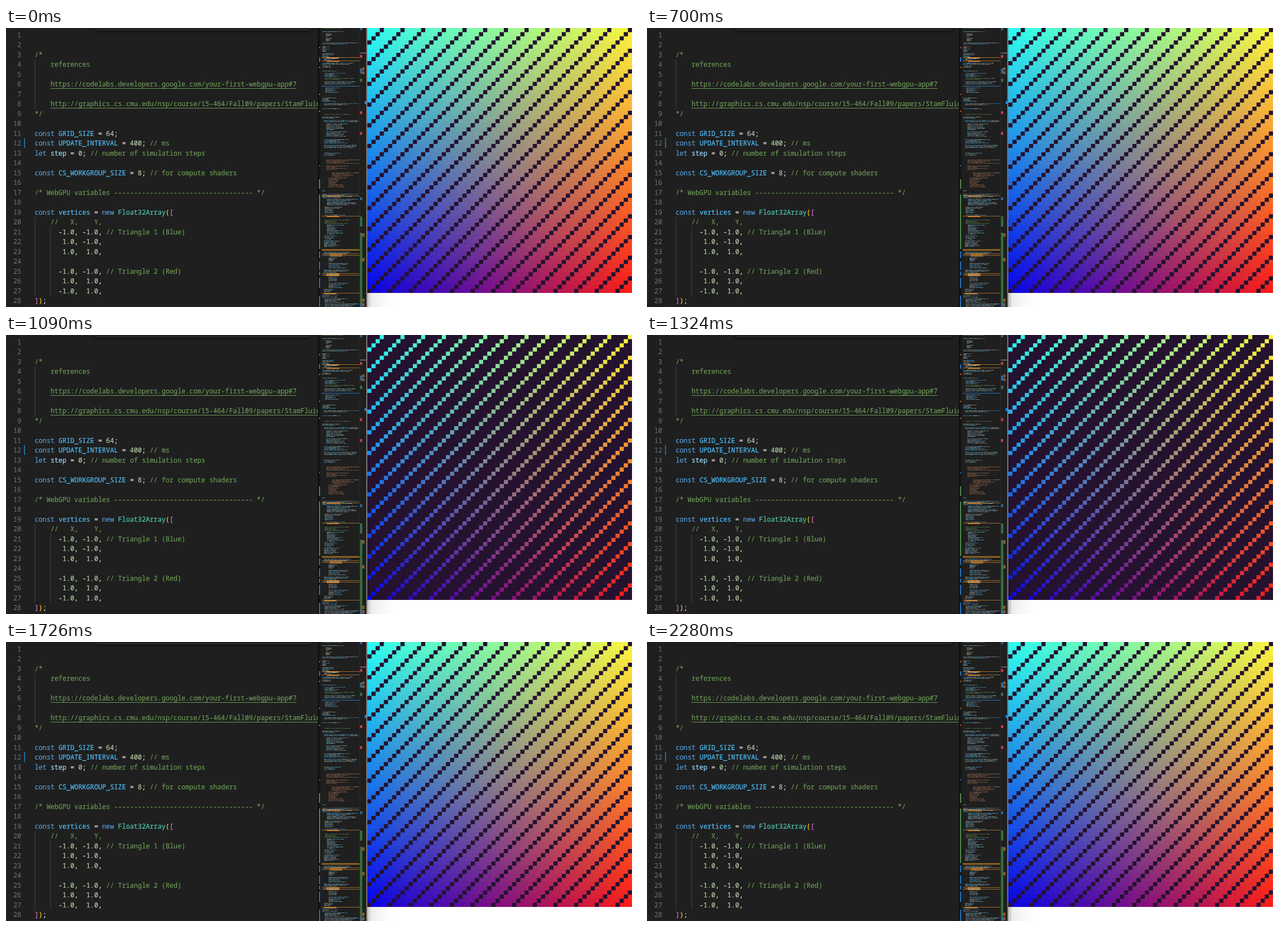
Recreate the animation shown at these times as an HTML page with a canvas. Size 1130 by 496 pixels, loop 2620 ms.

```html
<!DOCTYPE html>
<html lang="en">
<head>
<meta charset="utf-8">
<title>Grid simulation beside its code</title>
<style>
html, body { margin: 0; width: 100%; height: 100%; overflow: hidden; background: #fff; }
#stage { position: relative; width: 1130px; height: 496px; overflow: hidden; background: #fff; }
canvas { position: absolute; left: 0; top: 0; }
.grid { left: 643px; width: 471px; height: 471px; }
#editor {
  position: absolute; left: 0; top: 0; width: 555px; height: 496px; overflow: hidden;
  background: #1f1f1f; color: #d4d4d4;
  font: 11.775px/17.5px "Noto Sans Mono", "DejaVu Sans Mono", monospace;
  font-variant-ligatures: none; white-space: pre;
}
#editor div { position: absolute; }
.num { left: 0; width: 27px; text-align: right; color: #6e7681; }
.code { left: 51px; -webkit-text-stroke: 0.2px; }
.guide { width: 1px; background: #404040; }
.comment { color: #6a9955; }
.keyword { color: #569cd6; }
.constant { color: #4fc1ff; }
.variable { color: #9cdcfe; }
.type { color: #4ec9b0; }
.number { color: #b5cea8; }
.paren { color: #ffd700; }
.square { color: #da70d6; }
.link { text-decoration: underline 1px; text-underline-offset: 3px; text-decoration-skip-ink: none; }
#edited {
  left: 32px; top: 196px; width: 2px; height: 17px;
  background: repeating-linear-gradient(-45deg, #2090d3 0 1.5px, #1f4a66 1.5px 3px);
}
#popup {
  left: 158px; top: -12px; width: 383px; height: 14px; background: #1f1f1f;
  border: 1px solid #3c3c3c; border-radius: 4px; box-shadow: 0 0 7px #000;
}
</style>
</head>
<body>
<div id="stage">
  <canvas id="side" width="1130" height="496"></canvas>
  <div id="editor"></div>
  <canvas id="stripes" class="grid" width="512" height="512"></canvas>
  <canvas id="inverse" class="grid" width="512" height="512"></canvas>
</div>
<script>
const $ = id => document.getElementById(id);

const source = `

/*
    references

    https://codelabs.developers.google.com/your-first-webgpu-app#7

    http://graphics.cs.cmu.edu/nsp/course/15-464/Fall09/papers/StamFluids.pdf
*/

const GRID_SIZE = 64;
const UPDATE_INTERVAL = 400; // ms
let step = 0; // number of simulation steps

const CS_WORKGROUP_SIZE = 8; // for compute shaders

/* WebGPU variables ${"-".repeat(35)} */

const vertices = new Float32Array([
    //   X,    Y,
      -1.0, -1.0, // Triangle 1 (Blue)
       1.0, -1.0,
       1.0,  1.0,

      -1.0, -1.0, // Triangle 2 (Red)
       1.0,  1.0,
      -1.0,  1.0,
]);`;

// Editor text
const kinds = ["comment", "keyword", "constant", "variable", "type", "number", "paren", "square"];
const token = /(\/[/*].*)|\b(const|let|new)\b|\b([A-Z_]{4,}|vertices)\b|\b(step)\b|\b(Float32Array)\b|(\d[\d.]*)|([()])|([[\]])/g;
const span = (kind, text) => `<span class="${kind}">${text}</span>`;

function highlight(line, row) {
  if (row > 1 && row < 9)
    return span("comment", line.replace(/http\S+/, url => span("link", url)));
  return line.replace(token, (text, ...groups) =>
    span(kinds[groups.findIndex((g, i) => i < kinds.length && g !== undefined)], text));
}

const guide = (x, top, height) =>
  `<div class="guide" style="left:${x}px;top:${top}px;height:${height}px"></div>`;

$("editor").innerHTML = guide(51, 56, 88) + guide(51, 336, 140) + guide(79, 353, 123) +
  source.split("\n").map((line, row) => {
    const top = `style="top:${3.5 + row * 17.5}px"`;
    return `<div class="num" ${top}>${row + 1}</div><div class="code" ${top}>${highlight(line, row)}</div>`;
  }).join("") + '<div id="edited"></div><div id="popup"></div>';

// Minimap, overview ruler and the page edge below the grid
const side = $("side").getContext("2d");
const box = (color, x, y, w, h) => {
  side.fillStyle = color;
  side.fillRect(x, y, w, h);
};

let seed = 7;
const random = () => (seed = seed * 16807 % 2147483647) / 2147483647;

const palettes = {
  code: ["#7fb4cf", "#4f86b3", "#a8a8a8", "#48a8c8", "#8a9a8a"],
  note: ["#587d48"],
  nums: ["#a3b898"],
  text: ["#a8704f", "#8f6248"],
};

// Tiny code: first y, rows, left x, longest line, palette
const upper = [
  [0, 1, 563, 37, "note"], [6, 1, 563, 38, "code"], [10, 3, 569, 11, "nums"], [18, 3, 569, 11, "nums"],
  [26, 2, 563, 64, "code"], [33, 5, 563, 13, "code"], [45, 4, 563, 20, "code"], [54, 2, 566, 24, "code"],
  [62, 2, 563, 54, "code"], [67, 2, 563, 16, "code"], [76, 1, 563, 25, "code"], [80, 4, 567, 36, "code"],
  [89, 2, 567, 52, "note"], [95, 3, 567, 54, "code"], [106, 5, 568, 26, "code"], [124, 4, 563, 24, "code"],
  [134, 2, 566, 63, "code"], [143, 1, 563, 32, "code"], [153, 1, 567, 46, "note"], [158, 2, 563, 32, "code"],
  [164, 2, 566, 62, "code"], [170, 6, 570, 38, "code"], [184, 5, 570, 38, "code"], [198, 4, 566, 44, "code"],
  [208, 3, 566, 58, "code"], [222, 3, 566, 30, "code"], [234, 4, 570, 58, "text"], [245, 4, 570, 40, "text"],
  [257, 4, 580, 48, "text"], [266, 9, 574, 32, "text"],
];
const lower = [
  [289, 1, 563, 5, "code"], [295, 4, 563, 64, "code"], [304, 6, 571, 56, "code"], [318, 6, 567, 32, "code"],
  [332, 2, 567, 36, "code"], [341, 4, 567, 44, "note"], [350, 9, 571, 30, "code"], [369, 4, 567, 22, "code"],
  [378, 6, 566, 28, "code"], [398, 4, 566, 48, "code"], [408, 4, 574, 16, "code"], [418, 5, 574, 36, "code"],
  [430, 5, 566, 44, "code"], [443, 4, 574, 16, "code"], [453, 5, 574, 36, "code"], [464, 3, 566, 16, "code"],
  [474, 3, 563, 28, "code"], [481, 4, 567, 40, "code"], [490, 3, 567, 61, "code"],
];

function tinyCode([top, rows, left, longest, palette]) {
  const colors = palettes[palette];
  for (let row = 0; row < rows; row++) {
    const end = Math.min(628, left + longest * (row ? 0.4 + random() * 0.6 : 1));
    for (let x = left; x < end;) {
      const w = Math.min(2 + random() * 7, end - x);
      side.globalAlpha = 0.6 + random() * 0.35;
      box(colors[Math.floor(random() * colors.length)], x, top + row * 2, w, 1);
      x += w + 1;
    }
  }
  side.globalAlpha = 1;
}

box("#1f1f1f", 555, 0, 87, 496);
const shade = side.createLinearGradient(555, 0, 561, 0);
shade.addColorStop(0, "#0c0c0c");
shade.addColorStop(1, "#1f1f1f");
box(shade, 555, 0, 6, 496);

upper.forEach(tinyCode);
lower.forEach(tinyCode);

// Matches highlighted in the minimap
for (const y of [52, 58, 298, 334, 393, 401, 404, 436, 439, 471]) {
  box("#9b6a2b", 562, y, 67, 1);
  box("#d98a35", 566 + y % 3 * 5, y, 22, 2);
}
box("#876022", 562, 393, 67, 3);
box("#2f72b8", 562, 103, 67, 1);

// Change marks
for (const [y, h] of [[52, 8], [244, 2], [397, 12], [415, 15], [433, 7], [444, 18], [476, 20]])
  box("#2273c3", 557, y, 2, h);
for (const [y, h] of [[269, 17], [296, 97]]) box("#4f8a4b", 557, y, 2, h);
for (const y of [34, 69, 117, 147]) box("#c9652b", 557, y, 2, 2);

// Overview ruler
box("#2b2b2b", 629, 0, 1, 496);
for (const [y, h] of [[90, 6], [335, 18], [364, 132]]) box("#34703c", 630, y, 4, h);
for (const [y, h] of [[0, 4], [72, 9], [301, 5], [489, 7]]) box("#2867a0", 630, y, 4, h);
for (const y of [48, 148, 185]) box("#c93b3b", 630, y, 4, 5);
for (const [y, h] of [[70, 5], [77, 5], [365, 6], [409, 6], [481, 6], [489, 6]])
  box("#8a562c", 634, y, 4, h);
box("#1b87e5", 638, 130, 4, 5);
box("#a0a0a0", 630, 44, 11, 1);
box("#777", 641, 0, 2, 496);

const edge = side.createLinearGradient(643, 0, 690, 0);
edge.addColorStop(0, "#cdc6bf");
edge.addColorStop(0.1, "#d8d4d0");
edge.addColorStop(0.12, "#ececec");
edge.addColorStop(0.5, "#f6f6f6");
edge.addColorStop(1, "#fff");
box(edge, 643, 471, 47, 25);

// Simulation grid: every fifth cell is set, then all cells flip at each step
const size = 64, cell = 8;
const corners = { bl: [8, 4, 232], br: [250, 28, 24], tl: [44, 252, 240], tr: [248, 244, 64] };
const mix = (a, b, k) => a.map((v, i) => v + (b[i] - v) * k);

function drawGrid(id, isSet) {
  const g = $(id).getContext("2d");
  g.fillStyle = "#24122f";
  g.fillRect(0, 0, size * cell, size * cell);
  for (let i = 0; i < size * size; i++) {
    if (!isSet(i)) continue;
    const x = i % size, y = Math.floor(i / size);
    const low = mix(corners.bl, corners.br, x / 63);
    const high = mix(corners.tl, corners.tr, x / 63);
    g.fillStyle = `rgb(${mix(low, high, y / 63).map(Math.round)})`;
    g.fillRect(x * cell, (size - 1 - y) * cell, cell, cell);
  }
}

drawGrid("stripes", i => i % 5 === 0);
drawGrid("inverse", i => i % 5 !== 0);

const loop = 2620;
const flips = [0, 330, 700, 1090, 1480, 1890, 2280];
const frames = flips.map((time, i) => ({ offset: time / loop, opacity: (i + 1) % 2, easing: "step-end" }));
$("inverse").animate([...frames, { offset: 1, opacity: 1 }], { duration: loop, iterations: Infinity });
</script>
</body>
</html>
```
